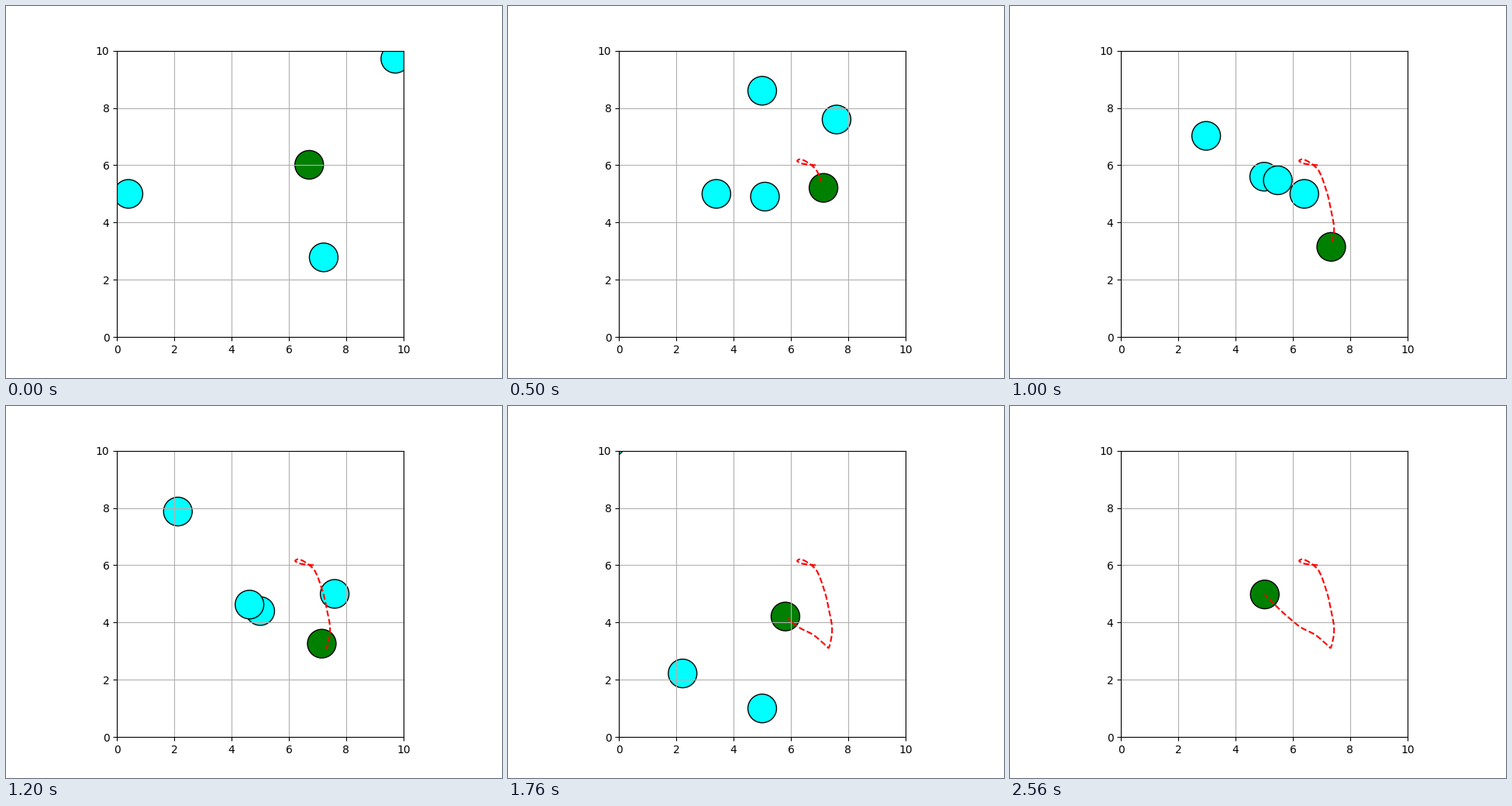
Animation, 640 px wide and 480 px high, one loop 2.64 s. Source, as a matplotlib script:

```python
import numpy as np
import matplotlib.pyplot as plt
from matplotlib.animation import FuncAnimation
from matplotlib.patches import Circle

TICK_MS = 10
LOOP_MS = 2640
RADIUS = 0.5
SPEED = 0.2

# Obstacles: start position and heading in degrees
OBSTACLES = [((0, 5), 0), ((5, 12), -90), ((10, 10), -135), ((7.5, 2.5), 135)]

# Key poses of the robot: step, x, y
KEY_POSES = np.array([
    (-1, 6.87, 6.00), (2, 6.42, 6.05), (5, 6.22, 6.15), (8, 6.39, 6.20),
    (12, 6.91, 5.80), (15, 7.14, 5.21), (20, 7.33, 4.44), (27, 7.43, 3.57),
    (30, 7.34, 3.15), (34, 7.24, 3.19), (42, 6.75, 3.59), (48, 6.25, 3.85),
    (53, 5.81, 4.21), (65, 5.02, 4.98),
])


def hermite(t, knots, values):
    """Smooth curve through the values at the given knots."""
    slopes = np.gradient(values, knots, axis=0)
    i = np.clip(np.searchsorted(knots, t, side="right") - 1, 0, len(knots) - 2)
    h = (knots[i + 1] - knots[i])[:, None]
    u = (t - knots[i])[:, None] / h
    return ((1 + 2 * u) * (1 - u) ** 2 * values[i]
            + u * (1 - u) ** 2 * h * slopes[i]
            + u ** 2 * (3 - 2 * u) * values[i + 1]
            + u ** 2 * (u - 1) * h * slopes[i + 1])


knots = KEY_POSES[:, 0]
path = hermite(np.arange(knots[0], knots[-1] + 1), knots, KEY_POSES[:, 1:])

fig, ax = plt.subplots(figsize=(6.4, 4.8), dpi=100)
ax.set_aspect("equal")
ax.set_xlim(0, 10)
ax.set_ylim(0, 10)
ax.grid(True)


def add_disc(color):
    return ax.add_patch(Circle((0, 0), RADIUS, fc=color, ec="black", lw=1))


robot = add_disc("green")
discs = [add_disc("cyan") for _ in OBSTACLES]
trail, = ax.plot([], [], "r--", lw=1.5)


def update(tick):
    # 30 steps per second, on a 10 ms clock
    step = (3 * tick + 2) // 10
    travel = SPEED * (step + 2)
    for disc, ((x, y), heading) in zip(discs, OBSTACLES):
        a = np.radians(heading)
        disc.center = x + travel * np.cos(a), y + travel * np.sin(a)
    robot.center = tuple(path[min(step + 1, len(path) - 1)])
    trail.set_data(*path[:step + 1].T)
    return [robot, *discs, trail]


anim = FuncAnimation(fig, update, frames=LOOP_MS // TICK_MS,
                     interval=TICK_MS, repeat=True, repeat_delay=0)
plt.show()
```
